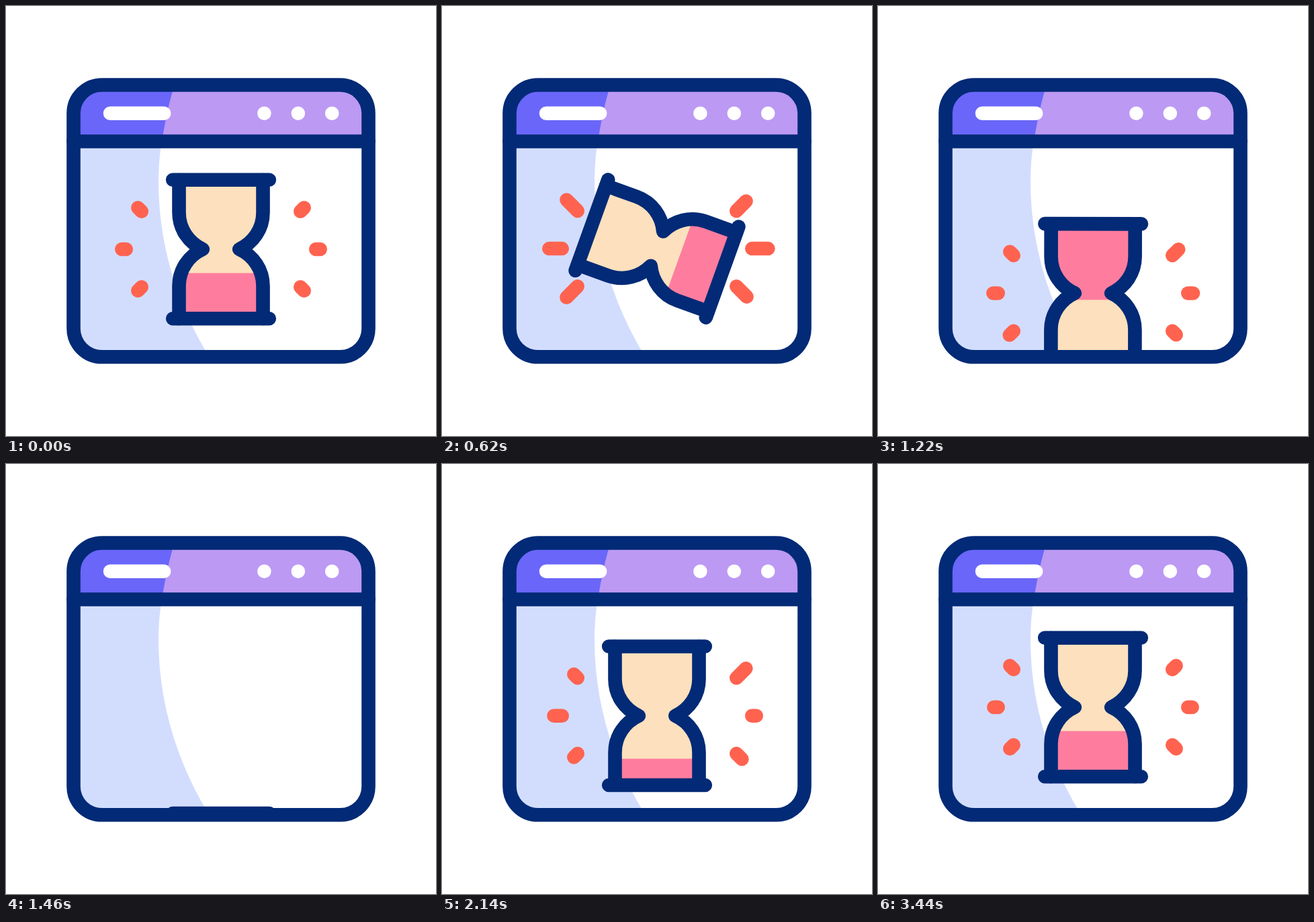
An HTML page for the animation above (3.6 s loop, 640 px wide and 640 px high).

```html
<!DOCTYPE html>
<html lang="en">
<head>
<meta charset="utf-8">
<title>Waiting window</title>
<style>
  html, body { margin: 0; width: 100%; height: 100%; overflow: hidden; background: #fff; }
  svg { display: block; width: 100vw; height: 100vh; }
  .ink { fill: none; stroke: #022a76; stroke-width: 20.6; stroke-linecap: round; stroke-linejoin: round; }
  #rays { stroke: #ff6350; stroke-width: 20.5; stroke-linecap: round; }
</style>
</head>
<body>
<svg viewBox="0 0 640 640">
  <defs>
    <clipPath id="frame"><rect x="100.5" y="117.5" width="439" height="405" rx="42"/></clipPath>
    <clipPath id="body"><path d="M110.7 211.8H529.3V480a32 32 0 0 1-32 32H142.7a32 32 0 0 1-32-32Z"/></clipPath>
    <clipPath id="glass"><path id="bulbs" d="M257.5 259V307.5C257.5 331.6 271.8 352.4 292.8 362C271.8 371.6 257.5 392.4 257.5 416.5V465H382.5V416.5C382.5 392.4 368.2 371.6 347.2 362C368.2 352.4 382.5 331.6 382.5 307.5V259Z"/></clipPath>
  </defs>

  <g clip-path="url(#frame)">
    <rect x="90" y="107" width="460" height="95" fill="#bc99f3"/>
    <path id="shade" d="M90 107H253L248 127C236 168 227 215 227 262C227 350 252 437 297 513L303 523H90Z" fill="#d2ddfe"/>
    <path d="M90 107H253L248 127C242 148 237 170 232 202H90Z" fill="#6a66f9"/>
  </g>
  <path d="M155 159.7H235.2" stroke="#fff" stroke-width="20.5" stroke-linecap="round"/>
  <g fill="#fff">
    <circle cx="384.4" cy="159.7" r="10.3"/>
    <circle cx="434.8" cy="159.7" r="10.3"/>
    <circle cx="485.2" cy="159.7" r="10.3"/>
  </g>
  <g class="ink">
    <rect x="100.5" y="117.5" width="439" height="404.8" rx="42.3"/>
    <path d="M100.5 201.5H539.5"/>
  </g>

  <g clip-path="url(#body)">
    <g id="drop">
      <g id="rays"></g>
      <g id="timer">
        <use href="#bulbs" fill="#fde0bd"/>
        <g clip-path="url(#glass)"><rect id="sand" x="250" width="140" height="130" fill="#fe7d9f"/></g>
        <g class="ink">
          <path d="M257.5 259V307.5C257.5 331.6 271.8 352.4 292.8 362C271.8 371.6 257.5 392.4 257.5 416.5V465"/>
          <path d="M382.5 259V307.5C382.5 331.6 368.2 352.4 347.2 362C368.2 371.6 382.5 392.4 382.5 416.5V465"/>
          <path d="M248.2 258.8H391.8M248.2 465.2H391.8"/>
        </g>
      </g>
    </g>
  </g>
</svg>
<script>
const LOOP = 3600, SWAP = 1527;
const $ = id => document.getElementById(id);
const drop = $('drop'), timer = $('timer'), sand = $('sand');

const ramp = (t, a, b) => Math.min(1, Math.max(0, (t - a) / (b - a)));
const ease = (t, a, b) => { const x = ramp(t, a, b); return x * x * (3 - 2 * x); };
const even = (from, to, n) => Array.from({ length: n + 1 }, (_, i) => from + (to - from) * i / n);

// x, y: inner end; dx, dy: resting length; gx, gy: growth; turns: times alternating short and long
const rays = [
  { x: 178.8, y: 362, dx: -6.5, dy: 0, gx: -15.5, gy: 0, turns: even(160, 3440, 6) },
  { x: 461.2, y: 362, dx: 6.5, dy: 0, gx: 18.5, gy: 0, turns: [160, 640, 1185, 1690, 2140, 2710, 3390] },
  { x: 201.8, y: 305.8, dx: -5.5, dy: -5.5, gx: -12.5, gy: -12.5, turns: [160, 690, 1220, 1700, 2140, 2750, 3430] },
  { x: 438.2, y: 305.8, dx: 5.5, dy: -5.5, gx: 12.5, gy: -12.5, turns: even(350, 3400, 8) },
  { x: 201.8, y: 418.2, dx: -5.5, dy: 5.5, gx: -12.5, gy: 12.5, turns: [160, 690, 1200, 1680, 2140, 2760, 3430] },
  { x: 438.2, y: 418.2, dx: 5.5, dy: 5.5, gx: 12.5, gy: 12.5, turns: [160, 745, 1220, 1785, 2240, 2890, 3440] }
];

for (const r of rays) {
  r.el = document.createElementNS('http://www.w3.org/2000/svg', 'line');
  r.el.setAttribute('x1', r.x);
  r.el.setAttribute('y1', r.y);
  $('rays').append(r.el);
}

function growth(t, turns) {
  const i = turns.findIndex(v => t < v);
  if (i < 1) return 0;
  const p = ramp(t, turns[i - 1], turns[i]);
  return i % 2 ? p : 1 - p;
}

// small lift, then an accelerating fall
const fall = t => -13 * ease(t, 560, 945) + 0.00103 * Math.max(0, t - 945) ** 2;
// the arrival mirrors the exit
const offset = t => t < SWAP ? fall(t) : -fall(2 * SWAP - t);
const angle = t => t < SWAP ? -180 * ease(t, 165, 1235) : 0;
const level = t => t < SWAP
  ? 397.5 - 45.5 * ease(t, 600, 1220)
  : 426.7 - 29.2 * ease(t, 2000, 3420);

function draw(t) {
  drop.setAttribute('transform', `translate(0 ${offset(t)})`);
  timer.setAttribute('transform', `rotate(${angle(t)} 320 362)`);
  sand.setAttribute('y', level(t));
  for (const r of rays) {
    const g = growth(t, r.turns);
    r.el.setAttribute('x2', r.x + r.dx + r.gx * g);
    r.el.setAttribute('y2', r.y + r.dy + r.gy * g);
  }
}

const start = performance.now();
function tick() {
  draw((performance.now() - start) % LOOP);
  requestAnimationFrame(tick);
}
tick();
</script>
</body>
</html>
```
